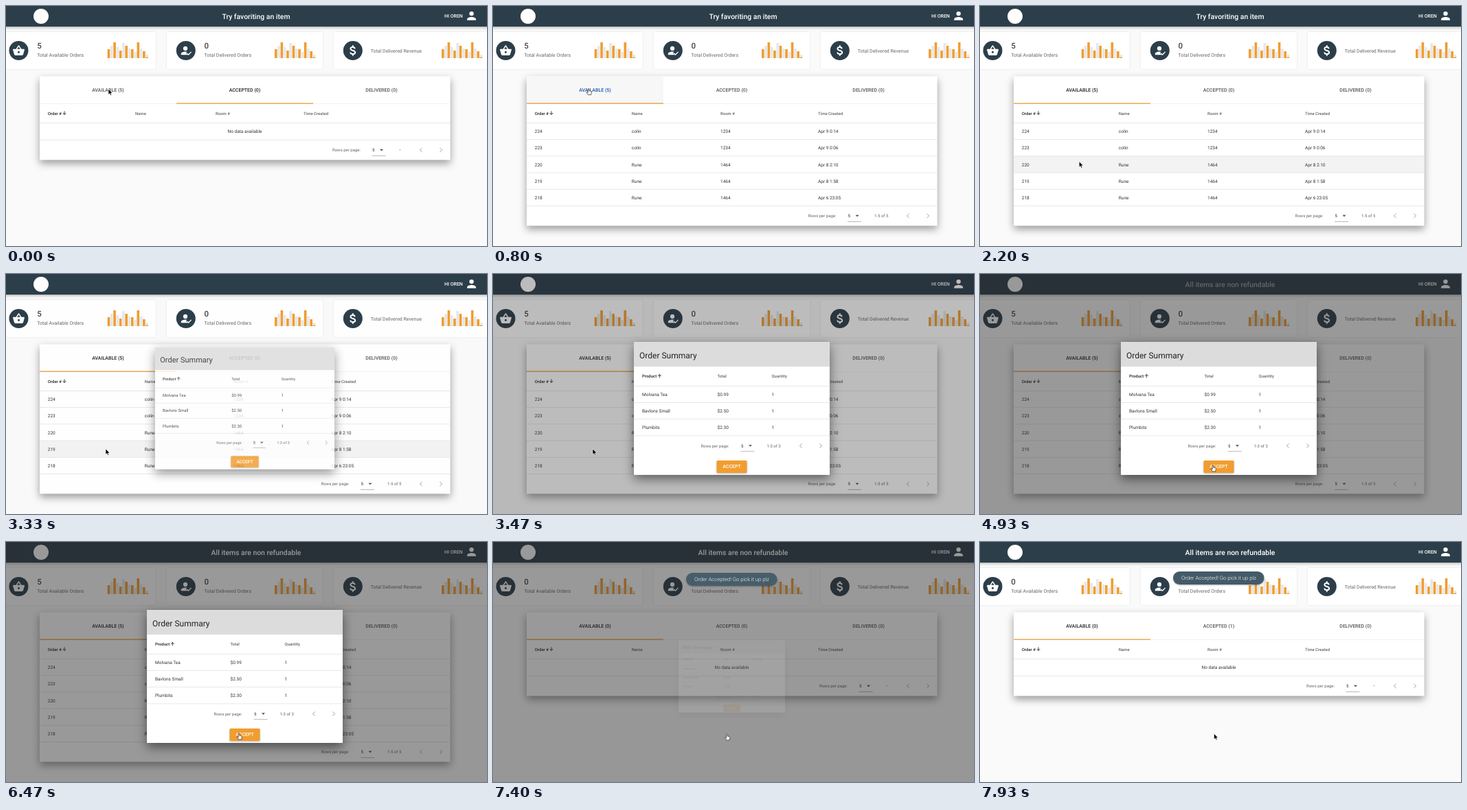
Animation, 700 px wide and 350 px high, one loop 8000 ms. Source, as an HTML page:

```html
<!DOCTYPE html>
<html lang="en">
<head>
<meta charset="utf-8">
<title>Order dashboard</title>
<style>
  html, body { margin: 0; width: 100%; height: 100%; overflow: hidden; background: #fafafa; }
  svg { display: block; width: 100vw; height: 100vh; font-family: Roboto, sans-serif; }
  text { text-rendering: geometricPrecision; white-space: pre; }
  .bar { filter: drop-shadow(0 1px 2px rgba(0, 0, 0, .35)); }
  .stat { filter: drop-shadow(0 0 1px rgba(0, 0, 0, .1)); }
  .card { filter: drop-shadow(0 5px 6px rgba(0, 0, 0, .38)); }
  .dialog { filter: drop-shadow(0 6px 8px rgba(0, 0, 0, .5)); }
  .button { filter: drop-shadow(0 1px 1px rgba(0, 0, 0, .3)); }
</style>
</head>
<body>
<svg id="stage" viewBox="0 0 700 350"></svg>
<script>
const LOOP = 8000;
const NAVY = '#2c3e4a', ORANGE = '#f19d2f', INK = '#222', SOFT = '#666';
const ROW = 24.2, TABLE_TOP = 170.5;

// ---- drawing helpers: y is the vertical middle of the text ----
const text = (x, y, str, size = 6.5, fill = '#333', weight = 400, anchor = 'start', id = '') =>
  `<text id="${id}" x="${x}" y="${y + size * 0.355}" font-size="${size}" fill="${fill}" font-weight="${weight}" text-anchor="${anchor}">${str}</text>`;
const rect = (x, y, w, h, fill, extra = '') =>
  `<rect x="${x}" y="${y}" width="${w}" height="${h}" fill="${fill}" ${extra}/>`;
const rule = (x, y, w, color = '#dedede') => rect(x, y - 0.35, w, 0.7, color);
const stroke = (d, color, width) =>
  `<path d="${d}" fill="none" stroke="${color}" stroke-width="${width}"/>`;
const sortArrow = (x, y, dir) =>
  stroke(`M${x} ${y - 2.6 * dir}V${y + 2.3 * dir}M${x - 2.3} ${y}L${x} ${y + 2.4 * dir}L${x + 2.3} ${y}`, INK, 0.9);

const PERSON = '<circle cx="12" cy="8" r="4"/><path d="M4 20v-2c0-2.7 5.3-4 8-4s8 1.3 8 4v2z"/>';
const ICONS = {
  basket: `<path fill-rule="evenodd" d="M17.2 9L12.8 2.4Q12 1.6 11.2 2.4L6.8 9H2Q1 9 1 10.3L3.6 19.5Q4 21 5.5 21H18.5Q20 21 20.4 19.5L23 10.3Q23 9 22 9ZM9 9L12 4.6 15 9ZM12 17a2 2 0 1 1 0-4 2 2 0 1 1 0 4Z"/>`,
  check: `<circle cx="11" cy="8" r="4"/><path d="M3 20v-2c0-2.7 5.3-4 8-4q1.6 0 3.2.4l-2 2 3.4 3.6z"/><path d="M14 17l2.8 2.8 5.2-5.4" fill="none" stroke="#fff" stroke-width="1.8"/>`,
  dollar: `<path d="M15.5 9Q15.2 6 11.8 6C9 6 8 7.3 8 8.8C8 13.2 16 10.8 16 15.2C16 17 14.4 18 12 18Q8 18 7.8 14.9M12 3V6M12 18V21" fill="none" stroke="#fff" stroke-width="2.3"/>`
};
const icon = (shape, cx, cy, scale) =>
  `<g fill="#fff" transform="translate(${cx} ${cy}) scale(${scale}) translate(-12 -12)">${shape}</g>`;

function chart(x) {
  const heights = [13, 18, 23, 16, 11, 22, 18, 14, 13, 9, 23, 14, 10, 5];
  return heights.map((h, i) =>
    rect(x + i * 4.28, 76 - h, 3.6, h, i % 2 ? '#e6e8ea' : ORANGE)).join('') +
    rect(x + 55.6, 74.6, 3.6, 1.4, ORANGE);
}

function stat(x, shape, scale, label, value, id) {
  const left = x + 54.5;
  return rect(x, 38, 227, 54, '#fff', 'rx="2" class="stat"') +
    `<circle cx="${x + 27.8}" cy="65" r="14" fill="${NAVY}"/>` + icon(shape, x + 27.8, 65, scale) +
    (value ? text(left, 58, value, 11.5, '#444', 500, 'start', id) + text(left, 71.5, label, 7, SOFT)
           : text(left - 0.8, 66, label, 7, SOFT)) +
    chart(x + 157);
}

function footer(y, labelX, valueX, range, rangeX, prevX, nextX) {
  const chevron = (x, dir) => stroke(`M${x + 1.6 * dir} ${y - 3}L${x - 1.6 * dir} ${y}L${x + 1.6 * dir} ${y + 3}`, '#999', 0.9);
  return text(labelX, y, 'Rows per page:', 6, SOFT) + text(valueX, y, '5', 6, INK) +
    `<path d="M${valueX + 11} ${y - 1.2}h5l-2.5 2.6z" fill="#555"/>` +
    rule(valueX - 0.5, y + 8.3, 20, '#999') + text(rangeX, y, range, 6, SOFT) +
    chevron(prevX, 1) + chevron(nextX, -1);
}

function table(id, columns, rows) {
  const heads = ['Order #', 'Name', 'Room #', 'Time Created'];
  const body = rows.map((cells, r) => {
    const y = TABLE_TOP + ROW * r;
    return cells.map((c, i) => text(columns[i], y + 12.3, c)).join('') + rule(49, y + ROW, 597);
  }).join('');
  const empty = text(347.5, 183, 'No data available', 6.5, '#333', 400, 'middle') + rule(49, 195.5, 597);
  return `<g id="${id}">` +
    heads.map((h, i) => text(columns[i], 156.5, h, 6, i ? SOFT : INK, 500)).join('') +
    sortArrow(85, 156, 1) + rule(49, TABLE_TOP, 597) + (rows.length
      ? body + footer(306, 458.5, 516.5, '1-5 of 5', 555, 604, 633)
      : empty + footer(210, 475, 533, '–', 571.5, 604, 633)) + '</g>';
}

function dialog() {
  const columns = [217, 326.5, 405.5];
  const items = [['Molvana Tea', '$0.99', '1'], ['Bavlons Small', '$2.50', '1'], ['Plumbits', '$2.30', '1']];
  return '<g id="dialog">' + rect(205, 99, 285, 194, '#fff', 'class="dialog"') +
    rect(205, 99, 285, 36, '#dcdcdc') + text(213, 119, 'Order Summary', 12, INK) +
    ['Product', 'Total', 'Quantity'].map((h, i) => text(columns[i], 149, h, 6, i ? SOFT : INK, 500)).join('') +
    sortArrow(242.3, 148.8, -1) + rule(205, 163.3, 285) +
    items.map((cells, r) => cells.map((c, i) => text(columns[i], 175.4 + ROW * r, c)).join('') +
      rule(205, 163.3 + ROW * (r + 1), 285)).join('') +
    footer(250.5, 302.5, 361, '1-3 of 3', 398.5, 448, 477) +
    rect(325.5, 272, 44, 18, ORANGE, 'rx="1.5" class="button"') +
    text(347.5, 281, 'ACCEPT', 7, '#fff', 500, 'middle') + '</g>';
}

const orders = [
  ['224', 'colin', '1234', 'Apr 9 0:14'],
  ['223', 'colin', '1234', 'Apr 9 0:06'],
  ['220', 'Rune', '1464', 'Apr 8 2:10'],
  ['219', 'Rune', '1464', 'Apr 8 1:58'],
  ['218', 'Rune', '1464', 'Apr 6 23:05']
];
const wide = [60.8, 201.8, 331, 473];

const stage = document.getElementById('stage');
stage.innerHTML =
  '<clipPath id="clip"><rect id="clipRect" x="49" y="102.5" width="597.5" height="122"/></clipPath>' +
  rect(0, 0, 700, 350, '#fafafa') +
  rect(-5, -5, 710, 35, NAVY, 'class="bar"') +
  '<circle cx="51" cy="15" r="11" fill="#fff"/>' +
  text(364, 15, '', 10.4, '#fff', 500, 'middle', 'title') +
  text(638, 14.7, 'HI OREN', 7, '#fff', 500) + icon(PERSON, 677.5, 14.3, 0.8) +
  stat(-9.3, ICONS.basket, 0.77, 'Total Available Orders', '5', 'available') +
  stat(234, ICONS.check, 0.78, 'Total Delivered Orders', '0', 'delivered') +
  stat(477, ICONS.dollar, 0.85, 'Total Delivered Revenue') +
  rect(49, 102.5, 597.5, 122, '#fff', 'id="card" class="card"') +
  '<g clip-path="url(#clip)">' +
  rect(49, 102.5, 199, 40, '#f7f7f7', 'id="tabHover"') +
  rect(49, 0, 597.5, ROW, '#f3f3f3', 'id="rowHover"') +
  [0, 1, 2].map(i => text(148.5 + 199 * i, 122.5, '', 7, INK, 500, 'middle', 'tab' + i)).join('') +
  rule(49, 142.6, 597, '#eee') +
  rect(49, 141.4, 199, 1.4, '#eda347', 'id="slider"') +
  table('accepted', [60.8, 188, 305, 433], []) +
  table('orders', wide, orders) + table('cleared', wide, []) + '</g>' +
  rect(0, 0, 700, 350, '#212121', 'id="overlay"') + dialog() +
  '<g id="toast">' + rect(281, 43, 132.5, 19, '#435b68', 'rx="9.5" class="button"') +
  text(347.5, 52.5, 'Order Accepted! Go pick it up plz', 7.7, '#fff', 300, 'middle') + '</g>' +
  '<g id="cursor"><path id="arrow" d="M0 0V8.2L1.9 6.5 3.2 9.3 4.6 8.7 3.4 6H6Z" fill="#000" stroke="#fff" stroke-width=".6"/>' +
  '<path id="hand" d="M-.8 .6Q0-.6 .8 .6V3.2L3.6 3.8Q4.6 4.2 4.4 5.6L3.6 9H-.6L-3 5.6Q-2.6 4.4-.8 5.8Z" fill="#fff" stroke="#222" stroke-width=".7"/></g>';

// ---- motion ----
const el = id => document.getElementById(id);
const set = (id, attrs) => { for (const k in attrs) el(id).setAttribute(k, attrs[k]); };
const show = (id, on) => set(id, { opacity: +on });
const phase = (t, start, length) => Math.min(1, Math.max(0, (t - start) / length));
const smooth = x => x * x * (3 - 2 * x);
const easeOut = (x, power) => 1 - (1 - x) ** power;

// time, x, y
const path = [
  [0, 149, 121], [350, 142, 121], [800, 139, 120.5], [1000, 139, 121], [1700, 142, 166],
  [1850, 143, 168], [2450, 145, 262], [2750, 145, 262], [2950, 145, 255], [3700, 145, 255],
  [4650, 339, 279], [7000, 339, 279], [7400, 340.5, 280], [8000, 340.5, 279.5]
];
function pointer(t) {
  const i = path.findIndex(p => p[0] > t);
  const [a, b] = [path[i - 1], path[i]];
  const k = smooth((t - a[0]) / (b[0] - a[0]));
  return [a[1] + (b[1] - a[1]) * k, a[2] + (b[2] - a[2]) * k];
}

function render(t) {
  const [x, y] = pointer(t);
  const cleared = t >= 7200;
  const slide = smooth(phase(t, 350, 300));

  const fadeOut = 1 - phase(t, 2300, 900), fadeIn = phase(t, 4450, 950);
  el('title').textContent = t < 3500 ? 'Try favoriting an item' : 'All items are non refundable';
  set('title', { opacity: t < 3500 ? fadeOut : fadeIn });

  const count = cleared ? 0 : 5;
  el('available').textContent = count;
  el('tab0').textContent = `AVAILABLE (${count})`;
  el('tab1').textContent = `ACCEPTED (${t >= 7860 ? 1 : 0})`;
  el('tab2').textContent = 'DELIVERED (0)';
  const onTab = t >= 350 && t < 1400;
  set('tab0', { fill: onTab ? '#1c57a5' : t < 350 ? '#555' : INK });
  set('tab1', { fill: t < 350 ? INK : '#555' });
  set('tab2', { fill: '#555' });
  show('tabHover', onTab);

  const height = cleared ? 122 : 122 + 96 * slide;
  set('card', { height });
  set('clipRect', { height });
  set('slider', { x: 248 - 199 * slide });
  set('accepted', { transform: `translate(${598 * slide})` });
  set('orders', { transform: `translate(${598 * (slide - 1)})` });
  show('accepted', slide < 1);
  show('orders', !cleared);
  show('cleared', cleared);

  const row = Math.floor((y - TABLE_TOP) / ROW);
  show('rowHover', row >= 0 && t < 3400);
  set('rowHover', { y: TABLE_TOP + ROW * Math.max(0, row) });

  set('overlay', { opacity: 0.46 * (smooth(phase(t, 3320, 250)) - smooth(phase(t, 7420, 280))) });
  const open = easeOut(phase(t, 3223, 300), 4) - easeOut(phase(t, 7264, 300), 4);
  set('dialog', {
    opacity: open,
    transform: `translate(347.5 196) scale(${0.5 + open / 2}) translate(-347.5 -196)`
  });

  const rise = easeOut(phase(t, 7215, 300), 3);
  set('toast', { opacity: rise, transform: `translate(0 ${35 * (1 - rise)})` });

  const hand = onTab || (t >= 4550 && t < 7500);
  set('cursor', { transform: `translate(${x} ${y})` });
  show('hand', hand);
  show('arrow', !hand);
}

const start = performance.now();
function tick() {
  render((performance.now() - start) % LOOP);
  requestAnimationFrame(tick);
}
tick();
</script>
</body>
</html>
```
